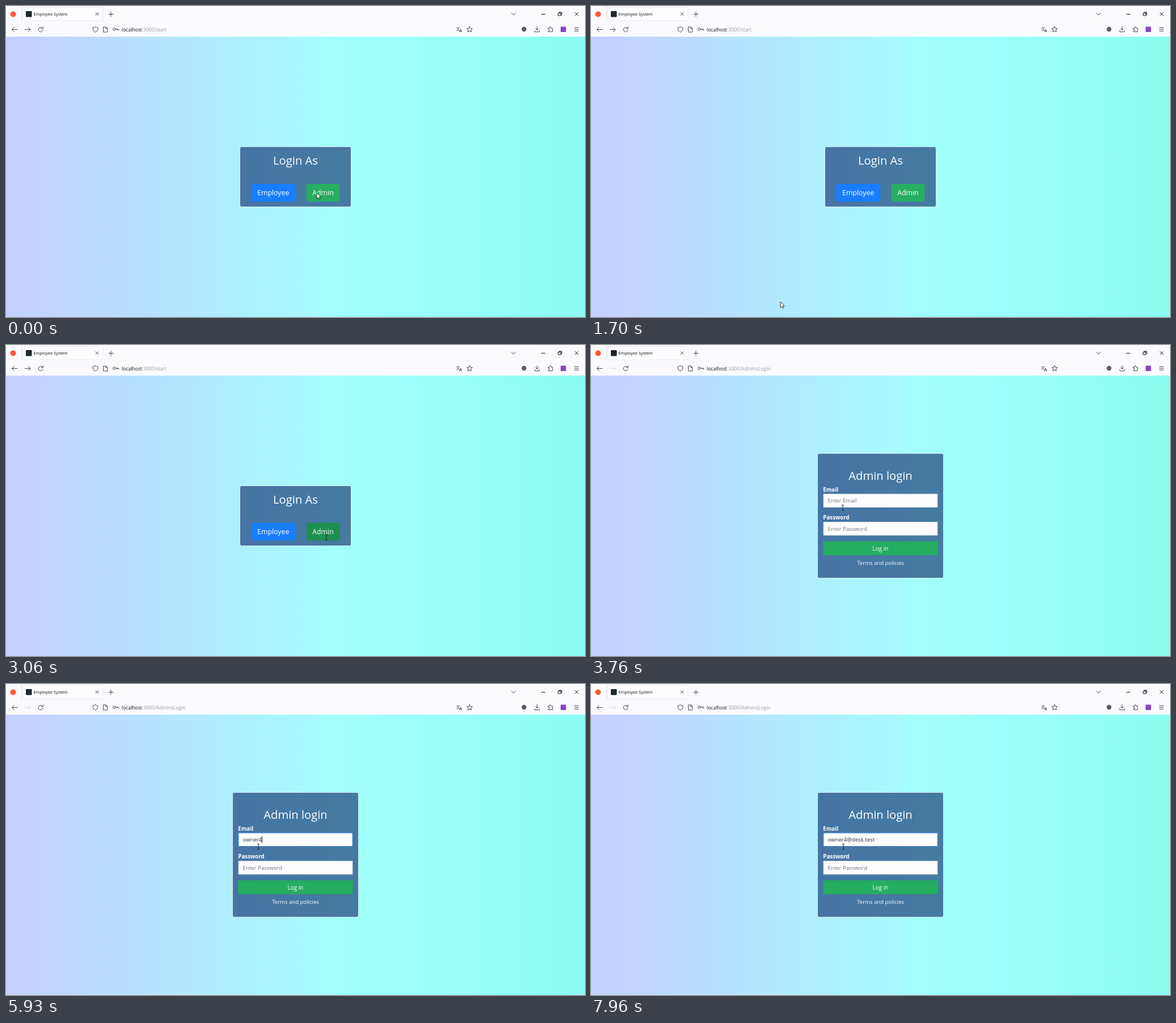
An HTML page that plays this animation: 1021 px wide and 549 px high, repeating every 8000 ms.

```html
<!DOCTYPE html>
<html lang="en">
<head>
<meta charset="utf-8">
<title>Employee System</title>
<style>
  html, body { margin: 0; width: 100%; height: 100%; overflow: hidden; background: #fbfbfe; }
  svg { display: block; width: 100vw; height: 100vh; }
  text { font-family: "Open Sans", "Noto Sans", sans-serif; white-space: pre; }
  .mid { text-anchor: middle; }
  .white { fill: #fff; }
  .h { font-size: 20.2px; }
  .btn { font-size: 12.35px; }
  .field { font-size: 9.6px; }
  .label { font-size: 9.75px; font-weight: 700; }
  .hint { fill: #70757a; }
  .icon { fill: none; stroke: #45454f; stroke-width: 1; stroke-linecap: round; stroke-linejoin: round; }
  .card { fill: url(#cardFill); stroke: #dcebf0; stroke-width: 1; }
</style>
</head>
<body>
<svg viewBox="0 0 1021 549" preserveAspectRatio="none">
  <defs>
    <linearGradient id="sky">
      <stop offset="0" stop-color="#c6cfff"/>
      <stop offset=".2" stop-color="#b9deff"/>
      <stop offset=".4" stop-color="#adf0ff"/>
      <stop offset=".53" stop-color="#a7f9ff"/>
      <stop offset=".55" stop-color="#a3fffb"/>
      <stop offset=".8" stop-color="#98fff7"/>
      <stop offset="1" stop-color="#8cfcf0"/>
    </linearGradient>
    <linearGradient id="cardFill">
      <stop offset="0" stop-color="#4674a5"/>
      <stop offset="1" stop-color="#457ba0"/>
    </linearGradient>
  </defs>

  <rect width="1021" height="549" fill="#fbfbfe"/>
  <rect y="54" width="1021" height="495" fill="url(#sky)"/>

  <!-- tab strip -->
  <circle cx="12.5" cy="14.5" r="5" fill="#ff5a36"/>
  <path d="M27.5 0V27" stroke="#dedee4"/>
  <rect x="29.5" y="2.5" width="141.500" height="23.500" rx="3" fill="#fdfdff" stroke="#ececf2"/>
  <rect x="35" y="9" width="10.500" height="10.500" rx="1" fill="#1d272e"/>
  <text x="48.500" y="17.200" font-size="7.350" fill="#15141a">Employee System</text>
  <g class="icon">
    <path d="M158.200 11.800l4.800 4.800m0-4.800l-4.800 4.800"/>
    <path d="M181 14.500h8m-4-4v8"/>
    <path d="M891.500 12.500l3.500 3.500l3.500-3.500"/>
    <path d="M944.500 14.500h6" stroke="#15141a"/>
    <path d="M974 12.500h4.500v4.500h-4.500zM975.500 12.300v-1.300h4.500v4.500h-1.300" stroke="#15141a"/>
    <path d="M1003.500 11.500l5.500 5.500m0-5.500l-5.500 5.500" stroke="#15141a"/>
  </g>

  <!-- toolbar -->
  <g class="icon">
    <path d="M20 41.500h-9.500m3.800-3.700l-3.800 3.700l3.800 3.700"/>
    <path id="forward" d="M33.500 41.500h9.500m-3.800-3.700l3.800 3.700l-3.800 3.700"/>
    <path d="M64.700 39.500a4 4 0 1 0 .5 3M65.400 36.800v3h-3"/>
    <path d="M157.500 36.700q2 1.500 4.300 1.500v2.800q-.5 4-4.300 5.300q-3.800-1.300-4.300-5.300v-2.800q2.300 0 4.300-1.500z"/>
    <path d="M172 37h4l2.800 2.800v6.200h-6.800zM176 37v2.800h2.800"/>
    <circle cx="190.700" cy="41" r="2.200"/>
    <path d="M193 41h5.700v2m-2.300-2v1.500"/>
    <path d="M817.500 36.300l1.500 3.200l3.500.4l-2.600 2.400l.7 3.500l-3.100-1.800l-3.100 1.800l.7-3.500l-2.600-2.400l3.500-.4z"/>
    <path d="M936.500 36.500v6m-2.700-2.600l2.700 2.700l2.700-2.700M932.500 43.500v2.200h8v-2.200"/>
    <path d="M956.500 39h2v-.8a1.400 1.400 0 0 1 2.800 0v.8h2.500v6.500h-7.300v-2h1a1.300 1.300 0 0 0 0-2.600h-1z"/>
    <path d="M1002.500 38.200h7m-7 3h7m-7 3h7"/>
  </g>
  <text x="793.800" y="43" font-size="6.800" fill="#33333c" style="font-family:'Noto Sans CJK SC','Noto Sans CJK',sans-serif">文</text>
  <text x="799.300" y="45.700" font-size="7.500" font-weight="600" fill="#33333c">A</text>
  <circle cx="913.500" cy="41" r="4.200" fill="#5b5b66"/>
  <rect x="978" y="36.500" width="9.500" height="9.500" rx="1" fill="#8a45c8"/>
  <text x="204" y="44.700" font-size="8.550" fill="#15141a">localhost<tspan id="path" fill="#9a9aa3"></tspan></text>

  <g id="start">
    <rect class="card" x="412.500" y="248.500" width="196" height="106" rx="3"/>
    <text class="mid white h" x="510.500" y="279.700">Login As</text>
    <rect x="432.500" y="314" width="77.500" height="31" rx="4" fill="#177eff"/>
    <rect id="admin" x="529.500" y="314" width="59" height="31" rx="4"/>
    <text class="mid white btn" x="471.200" y="334.400">Employee</text>
    <text class="mid white btn" x="559" y="334.400">Admin</text>
  </g>

  <g id="login">
    <rect class="card" x="399.500" y="191.500" width="222" height="220" rx="3"/>
    <text class="mid white h" x="510.500" y="238.200">Admin login</text>
    <text class="white label" x="409.300" y="258.500">Email</text>
    <rect id="emailBox" x="410" y="263" width="201" height="23.500" fill="#fdfdff"/>
    <text id="email" class="field" x="417.500" y="278.300"></text>
    <path id="caret" stroke="#15141a" stroke-width="1"/>
    <text class="white label" x="409.300" y="308.400">Password</text>
    <rect x="410" y="312.500" width="201" height="23.500" fill="#fdfdff" stroke="#d5dce4" stroke-width=".7"/>
    <text class="field hint" x="417.500" y="328.200">Enter Password</text>
    <rect x="409.500" y="346.500" width="202" height="24.500" fill="#25ad60"/>
    <text class="mid white" x="510.500" y="362.700" font-size="10">Log in</text>
    <text class="mid white" x="510.500" y="387.600" font-size="9.550">Terms and policies</text>
  </g>

  <path id="arrow" d="M0 0V10.200L2.300 8L4 11.800L5.700 11L4.100 7.400H7.200Z" fill="#fff" stroke="#111" stroke-width=".8" stroke-linejoin="round"/>
  <path id="beam" d="M-2-4.700H-.6L0-4.200L.6-4.700H2M0-4.200V4.200M-2 4.700H-.6L0 4.200L.6 4.700H2" fill="none" stroke="#1c2430" stroke-width="1"/>
</svg>
<script>
  const LOOP = 8000, PAGE_AT = 3320, FOCUS_AT = 3880;
  const ADDRESS = "owner4@desk.test";
  // time of each key press, one per letter
  const KEYS = [4080, 4200, 4310, 4420, 4520, 5560, 5960, 6340, 6450, 6560, 6660, 6780, 7080, 7180, 7290, 7400];
  // pointer stops: time, x, y
  const STOPS = [
    [0, 548, 330], [30, 548, 330], [830, 400, 450], [930, 400, 450], [1130, 350, 500],
    [1500, 350, 500], [1700, 334, 522], [1930, 334, 522], [2000, 345, 512], [2160, 345, 512],
    [2960, 565, 340], [3380, 565, 340], [3720, 444, 287], [3830, 444, 287], [3900, 445, 287], [LOOP, 445, 287]
  ];
  const $ = id => document.getElementById(id);
  const show = (id, on) => $(id).setAttribute("visibility", on ? "visible" : "hidden");
  const set = (id, attrs) => { for (const k in attrs) $(id).setAttribute(k, attrs[k]); };
  const inside = ([x, y], l, t, r, b) => x >= l && x <= r && y >= t && y <= b;

  function pointerAt(t) {
    const i = STOPS.findIndex(s => s[0] > t);
    const [t0, x0, y0] = STOPS[i - 1], [t1, x1, y1] = STOPS[i];
    const p = (t - t0) / (t1 - t0), e = p * p * (3 - 2 * p);
    return [x0 + (x1 - x0) * e, y0 + (y1 - y0) * e];
  }

  function drawEmail(t) {
    const focused = t >= FOCUS_AT;
    const count = KEYS.filter(k => k <= t).length;
    const box = $("email");
    box.textContent = count ? ADDRESS.slice(0, count) : "Enter Email";
    box.setAttribute("fill", count ? "#2b3038" : "#70757a");
    set("emailBox", { stroke: focused ? "#4a90e8" : "#d5dce4", "stroke-width": focused ? 1 : 0.7 });
    const since = t - (count ? KEYS[count - 1] : FOCUS_AT);
    const x = 417.7 + (count ? box.getComputedTextLength() : 0);
    set("caret", { d: `M${x} 268.500V281` });
    show("caret", focused && t >= PAGE_AT && since % 1000 < 500);
  }

  function draw(t) {
    const onLogin = t >= PAGE_AT;
    const pos = pointerAt(t);
    const hover = !onLogin && t > 2000 && inside(pos, 529, 314, 589, 345);
    const beam = hover || onLogin && inside(pos, 409, 262, 612, 288);
    show("start", !onLogin);
    show("login", onLogin);
    $("path").textContent = onLogin ? ":3000/AdminsLogin" : ":3000/start";
    set("forward", { stroke: onLogin ? "#dcdce2" : "#45454f" });
    set("admin", { fill: hover ? "#1f8f50" : "#27ae60" });
    drawEmail(t);
    for (const id of ["arrow", "beam"]) set(id, { transform: `translate(${pos})` });
    show("arrow", !beam);
    show("beam", beam);
  }

  const began = performance.now();
  function tick() {
    draw((performance.now() - began) % LOOP);
    requestAnimationFrame(tick);
  }
  tick();
</script>
</body>
</html>
```
